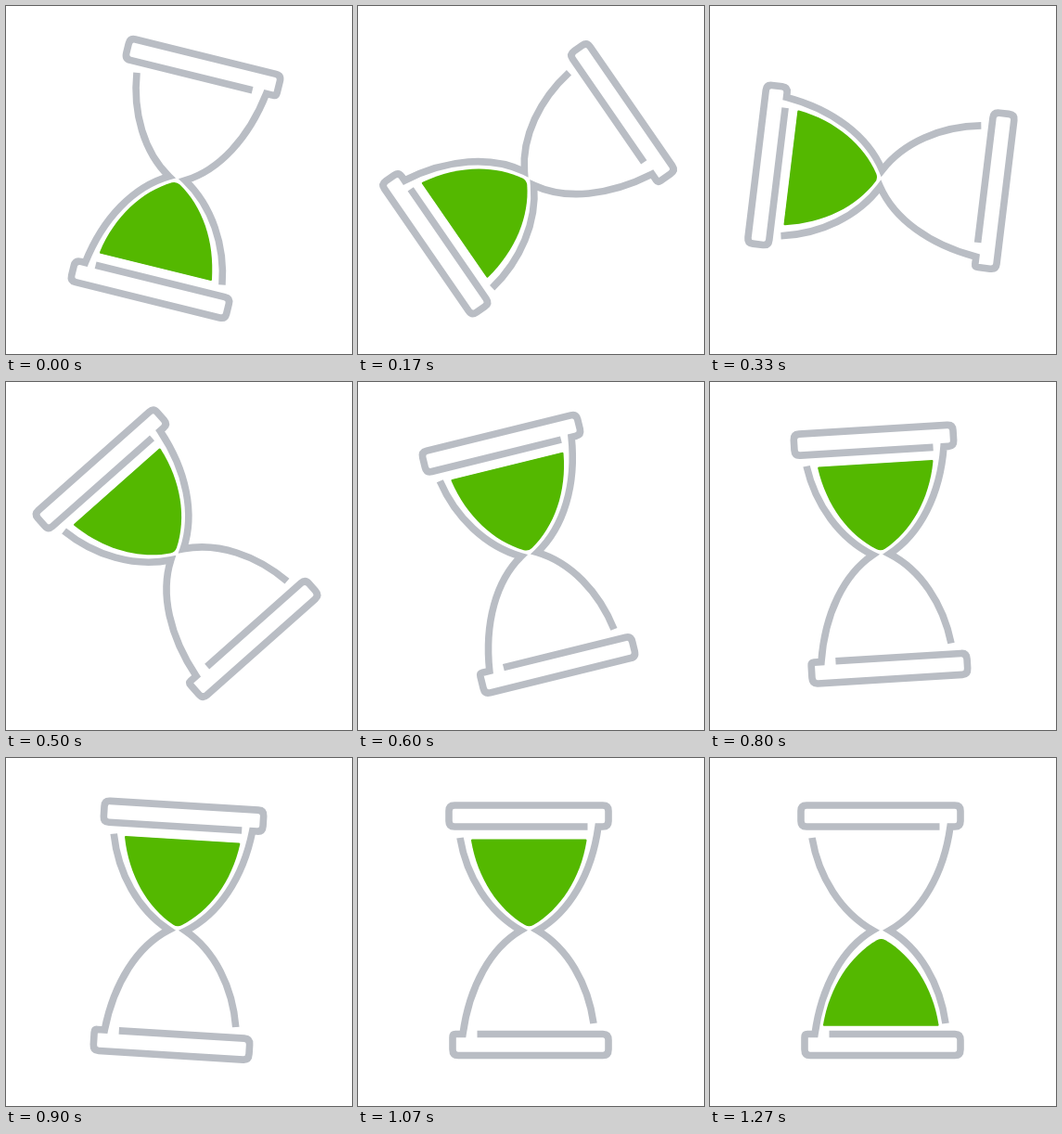
Recreate the animation shown at these times as an HTML page. Size 373 px wide and 375 px high, loop 1.33 s.

```html
<!DOCTYPE html>
<html lang="en">
<head>
<meta charset="utf-8">
<title>Hourglass</title>
<style>
  html, body { margin: 0; height: 100%; overflow: hidden; background: #fff; }
  svg { display: block; width: 100vw; height: 100vh; }
  .glass { fill: none; stroke: #b9bdc4; stroke-width: 7.6; }
  .sand { fill: #54b800; }
</style>
</head>
<body>
<svg viewBox="0 0 373 375">
  <defs>
    <path id="sand" d="M123 87.5H245.500Q246.700 87.500 246.500 89C240 130 218 163 189 180Q184.500 182.500 180 180C151 163 129 130 122 89Q121.800 87.500 123 87.500Z"/>
    <clipPath id="topClip"><rect id="topLevel" x="100" width="170" height="100"/></clipPath>
    <clipPath id="bottomClip"><rect id="bottomLevel" x="100" y="87" width="170"/></clipPath>
  </defs>
  <g id="hourglass">
    <g class="glass">
      <path d="M247.500 74H104Q98 74 98 68V57Q98 51 104 51H264Q270 51 270 57V68Q270 74 264 74H259C252 125 228 166 193.500 185.800C226 205 248 243 254 286"/>
      <path d="M110 86C117 128 141 166 175.500 185.800C143 205 120 246 113 297.500H105Q102 297.500 102 301V314Q102 320.500 108 320.500H264Q270 320.500 270 314V304Q270 297.500 264 297.500H128.500"/>
    </g>
    <g class="sand">
      <use href="#sand" clip-path="url(#topClip)"/>
      <g transform="matrix(1 0 0 -1 0 376.300)"><use href="#sand" clip-path="url(#bottomClip)"/></g>
    </g>
  </g>
</svg>
<script>
  const LOOP = 1330;
  // Start of each pose in ms
  const starts = [0, 70, 100, 170, 230, 270, 330, 370, 430, 500, 530, 600, 670,
    700, 730, 800, 830, 900, 970, 1000, 1070, 1100, 1170, 1200, 1270];
  const TURN_END = 12, SHAKE_END = 20, FALL_START = 21, FALL_END = 24;
  const SAND_TOP = 87, SAND_HEIGHT = 96;
  const byId = id => document.getElementById(id);

  function angleAt(step) {
    if (step <= TURN_END) return 180 * (step + 1) / (TURN_END + 1) - 180;
    if (step < SHAKE_END) return 3.5 * Math.sin((step - TURN_END) * Math.PI / 2);
    return 0;
  }

  function draw(now) {
    const time = now % LOOP;
    const step = starts.findLastIndex(start => start <= time);
    const fill = Math.max(0, (step - FALL_START) / (FALL_END - FALL_START));
    const drained = step < FALL_START ? 0 : 0.18 + 0.82 * fill;
    byId('hourglass').setAttribute('transform', `rotate(${angleAt(step)} 184.5 185.8)`);
    byId('topLevel').setAttribute('y', SAND_TOP + SAND_HEIGHT * drained);
    byId('bottomLevel').setAttribute('height', SAND_HEIGHT * fill);
  }

  function tick() {
    draw(performance.now());
    requestAnimationFrame(tick);
  }
  tick();
</script>
</body>
</html>
```
